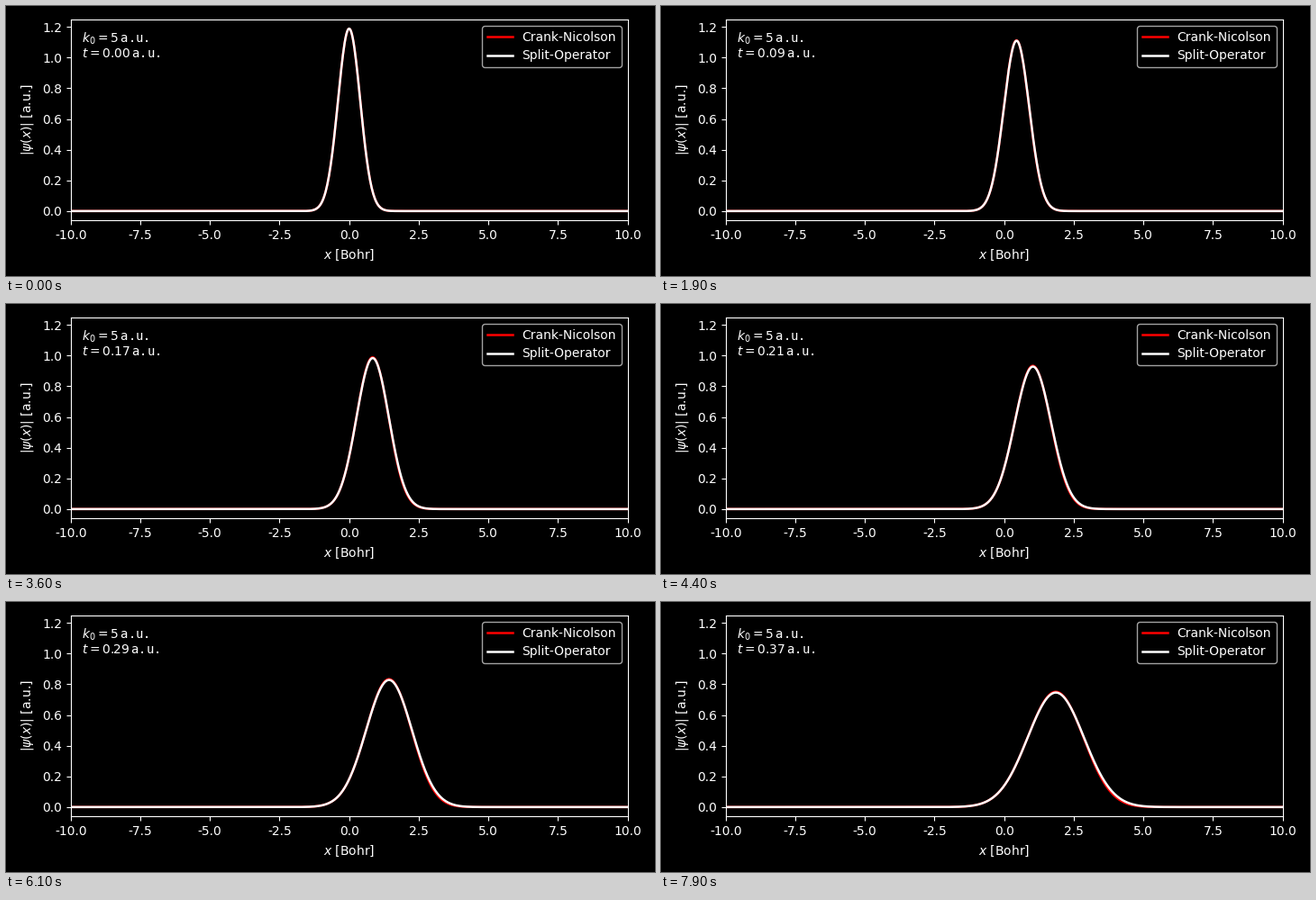
Write a matplotlib script that moves like this. It is 720x300 px and loops after 8000 ms.

```python
import numpy as np
import matplotlib.pyplot as plt
from matplotlib.animation import FuncAnimation

plt.style.use("dark_background")
plt.rcParams["font.family"] = "DejaVu Sans"
plt.rcParams["axes.unicode_minus"] = False
plt.rcParams["axes.labelpad"] = 4.7

FRAMES, INTERVAL = 80, 100
DT = 0.0047   # atomic units per frame
K0 = 5        # mean momentum of the packet
N = 680

x = np.linspace(-10, 10, N)
dx = x[1] - x[0]
k = 2 * np.pi * np.fft.fftfreq(N, dx)
packet = np.fft.fft(2 ** 0.25 * np.exp(-np.pi * x**2 + 1j * K0 * x))

# Phase gained per step: exact kinetic energy, and finite differences
# advanced with the implicit midpoint rule.
exact_phase = k**2 / 2 * DT
lattice_phase = 2 * np.arctan((1 - np.cos(k * dx)) / dx**2 * DT / 2)


def modulus(phase, step):
    return np.abs(np.fft.ifft(packet * np.exp(-1j * phase * step)))


def time_text(step):
    return rf"$t = {step * DT:.2f}\,$a.u."


fig, ax = plt.subplots(figsize=(7.2, 3), dpi=100)
cn_line, = ax.plot(x, modulus(lattice_phase, 0), "r", lw=1.8, label="Crank-Nicolson")
so_line, = ax.plot(x, modulus(exact_phase, 0), "w", lw=1.8, label="Split-Operator")

ax.set_xlim(-10, 10)
ax.set_ylim(-0.0595, 1.2487)
ax.set_xlabel("$x$ [Bohr]")
ax.set_ylabel(r"$|\psi(x)|$ [a.u.]")
mono = dict(family="DejaVu Sans Mono")
ax.text(-9.6, 1.1, rf"$k_0 = {K0}\,$a.u.", **mono)
clock = ax.text(-9.6, 1.0, time_text(0), **mono)
ax.legend(loc="upper right")
fig.tight_layout()
fig.subplots_adjust(left=71.7 / 720, bottom=62 / 300)


def update(step):
    cn_line.set_ydata(modulus(lattice_phase, step))
    so_line.set_ydata(modulus(exact_phase, step))
    clock.set_text(time_text(step))
    return cn_line, so_line, clock


anim = FuncAnimation(fig, update, frames=FRAMES, interval=INTERVAL,
                     repeat=True, repeat_delay=0)
plt.show()
```
